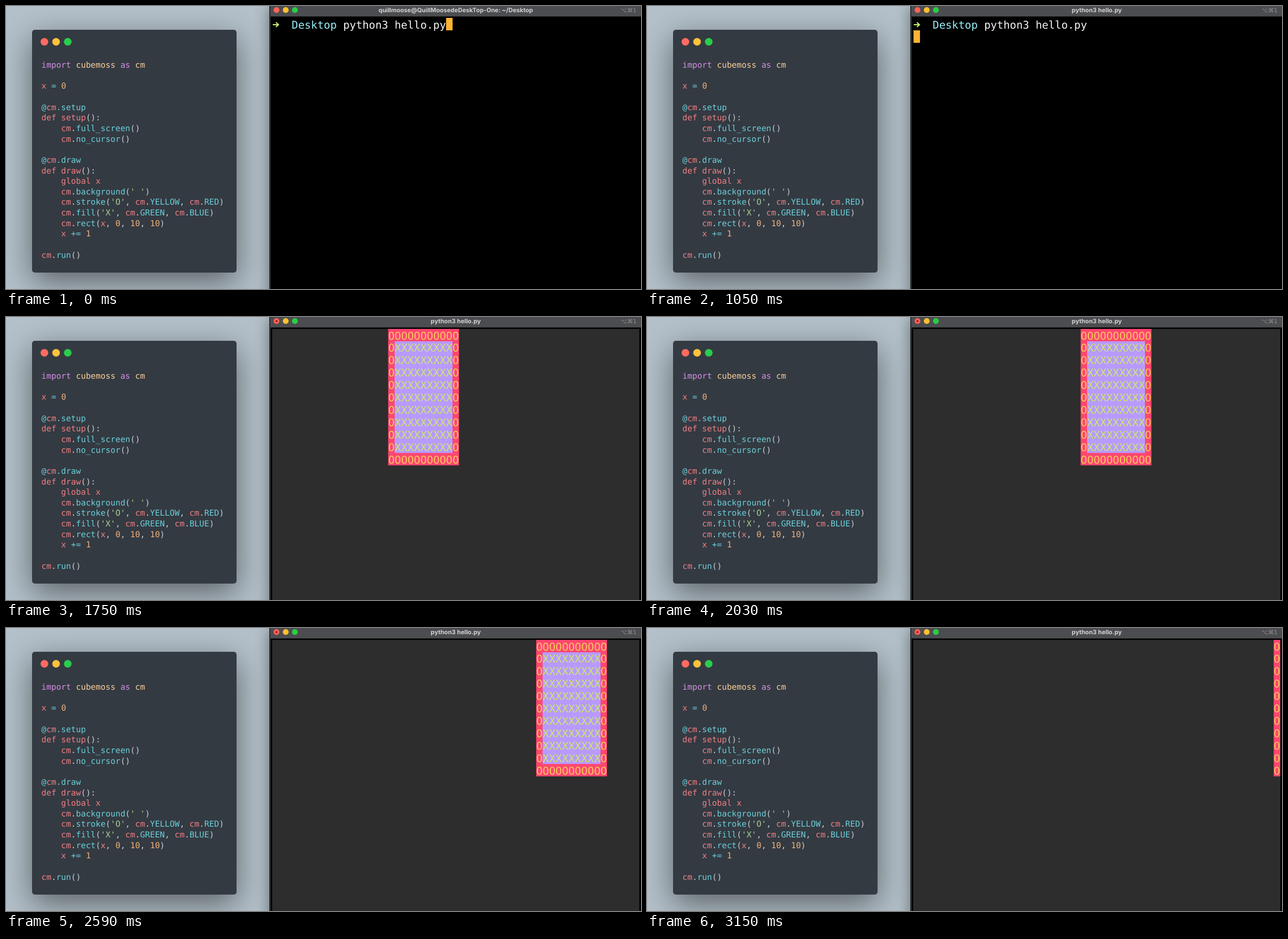
Animation of 1121 by 500 pixels, one loop 3.22 s. Source, as an HTML page:

```html
<!DOCTYPE html>
<html lang="en">
<head>
<meta charset="utf-8">
<title>Terminal rectangle demo</title>
<style>
  html, body { margin: 0; width: 100%; height: 100%; overflow: hidden; }
  body { position: relative; background: #b4c1ca; text-rendering: geometricPrecision; }
  #card, #window, pre, svg { position: absolute; margin: 0; }
  #card {
    left: 46px; top: 42px; width: 361px; height: 429px; border-radius: 5px;
    background: #343a42; box-shadow: 0 16px 55px rgba(0, 0, 0, .5);
  }
  #window {
    left: 465px; top: -6px; width: 680px; height: 520px;
    background: #000; box-shadow: 0 8px 24px rgba(0, 0, 0, .45);
  }
  pre {
    left: 62.5px; top: 96.1px; color: #c8cdd3;
    font: 14.48px/18.64px "DejaVu Sans Mono", monospace;
  }
  .key { color: #d48fe6; }
  .mod { color: #fbcf9b; }
  .var { color: #f07f83; }
  .fn  { color: #6bd0da; }
  .num { color: #f2b27a; }
  .str { color: #a5d294; }
  svg { left: 0; top: 0; }
  .mono { font: 18.869px "DejaVu Sans Mono", monospace; white-space: pre; }
  .title { font: 700 10.7px Inter, sans-serif; fill: #d3d3d4; text-anchor: middle; }
  .hint { font: 10px "DejaVu Sans", sans-serif; fill: #929294; text-anchor: end; }
</style>
</head>
<body>
<div id="card"></div>
<div id="window"></div>
<pre><span class="key">import</span> <span class="mod">cubemoss</span> <span class="key">as</span> <span class="mod">cm</span>

<span class="var">x</span> <span class="fn">=</span> <span class="num">0</span>

<span class="fn">@</span><span class="var">cm</span><span class="fn">.setup</span>
<span class="var">def setup</span>():
    <span class="var">cm</span>.<span class="fn">full_screen</span>()
    <span class="var">cm</span>.<span class="fn">no_cursor</span>()

<span class="fn">@</span><span class="var">cm</span><span class="fn">.draw</span>
<span class="var">def draw</span>():
    <span class="var">global x</span>
    <span class="var">cm</span>.<span class="fn">background</span>(<span class="str">' '</span>)
    <span class="var">cm</span>.<span class="fn">stroke</span>(<span class="str">'O'</span>, <span class="var">cm</span>.<span class="fn">YELLOW</span>, <span class="var">cm</span>.<span class="fn">RED</span>)
    <span class="var">cm</span>.<span class="fn">fill</span>(<span class="str">'X'</span>, <span class="var">cm</span>.<span class="fn">GREEN</span>, <span class="var">cm</span>.<span class="fn">BLUE</span>)
    <span class="var">cm</span>.<span class="fn">rect</span>(<span class="var">x</span>, <span class="num">0</span>, <span class="num">10</span>, <span class="num">10</span>)
    <span class="var">x</span> <span class="fn">+=</span> <span class="num">1</span>

<span class="var">cm</span>.<span class="fn">run</span>()</pre>
<svg width="1121" height="500">
  <clipPath id="screenClip"><rect x="470" y="21" width="648" height="479"/></clipPath>

  <circle cx="67.8" cy="63.2" r="6.7" fill="#ff6b62"/>
  <circle cx="88.4" cy="63.2" r="6.7" fill="#ffc23c"/>
  <circle cx="109" cy="63.2" r="6.7" fill="#2acd4c"/>

  <rect x="466" width="1" height="500" fill="#505153"/>
  <rect x="466" width="655" height="18.5" fill="#4c4d50"/>
  <circle cx="477.5" cy="7.2" r="5.1" fill="#ff6259"/>
  <circle id="busyDot" cx="477.5" cy="7.2" r="1.6" fill="#7d1510"/>
  <circle cx="493.8" cy="7.2" r="5.1" fill="#ffbf2f"/>
  <circle cx="510" cy="7.2" r="5.1" fill="#29ce42"/>
  <text id="title" class="title" x="794" y="10.7"></text>
  <text class="hint" x="1113" y="10.5">⌥⌘1</text>

  <g id="shell">
    <path d="M471 33H480M476.5 29L481 33L476.5 37" fill="none" stroke="#c9ee70" stroke-width="2"/>
    <text class="mono" x="504.3" y="39.5" fill="#f4f4f4"><tspan fill="#98eef8">Desktop</tspan> python3 hello.py</text>
    <rect id="cursor" width="11.4" height="22" fill="#ffb433"/>
  </g>

  <g id="screen" clip-path="url(#screenClip)">
    <rect x="470" y="21" width="648" height="479" fill="#2d2d2d"/>
    <g id="box"></g>
  </g>
</svg>
<script>
  const LOOP = 3220, STEP = 70;
  const CELL_W = 11.36, CELL_H = 21.92, LEFT = 470.2, TOP = 21, SIZE = 11;
  const ENTER_AT = 700, DRAW_AT = 1120, BLINK_AT = 350;
  const el = id => document.getElementById(id);
  const [title, shell, cursor, screen, box, busyDot] =
    ["title", "shell", "cursor", "screen", "box", "busyDot"].map(el);

  const fillRect = (col, row, cols, rows, color) =>
    `<rect x="${col * CELL_W}" y="${row * CELL_H}" width="${cols * CELL_W}" height="${rows * CELL_H}" fill="${color}"/>`;

  const span = (text, color) => `<tspan fill="${color}">${text}</tspan>`;

  function textRow(row) {
    const edge = row === 0 || row === SIZE - 1;
    const stroke = n => span("O".repeat(n), "#f7c75f");
    const cells = edge ? stroke(SIZE) : stroke(1) + span("X".repeat(SIZE - 2), "#cbe572") + stroke(1);
    return `<text class="mono" y="${row * CELL_H + 18.5}">${cells}</text>`;
  }

  box.innerHTML = fillRect(0, 0, SIZE, SIZE, "#ff4670")
    + fillRect(1, 1, SIZE - 2, SIZE - 2, "#b89aff")
    + Array.from({ length: SIZE }, (_, row) => textRow(row)).join("");

  const show = (node, on) => node.setAttribute("visibility", on ? "visible" : "hidden");

  function render() {
    const tick = Math.floor(performance.now() % LOOP / STEP);
    const time = tick * STEP;
    const running = time >= ENTER_AT, drawing = time >= DRAW_AT;

    title.textContent = running ? "python3 hello.py" : "quillmoose@QuillMoosedeDeskTop-One: ~/Desktop";
    show(shell, !drawing);
    show(screen, drawing);
    show(busyDot, drawing);
    show(cursor, !drawing && (running || time < BLINK_AT));
    cursor.setAttribute("x", running ? 470.5 : 777);
    cursor.setAttribute("y", running ? 43 : 21);

    // The program advances 1.9 columns per step, in whole columns.
    const column = Math.floor(1.5 + 1.9 * (time - DRAW_AT) / STEP);
    box.setAttribute("transform", `translate(${LEFT + column * CELL_W} ${TOP})`);
    requestAnimationFrame(render);
  }
  render();
</script>
</body>
</html>
```
